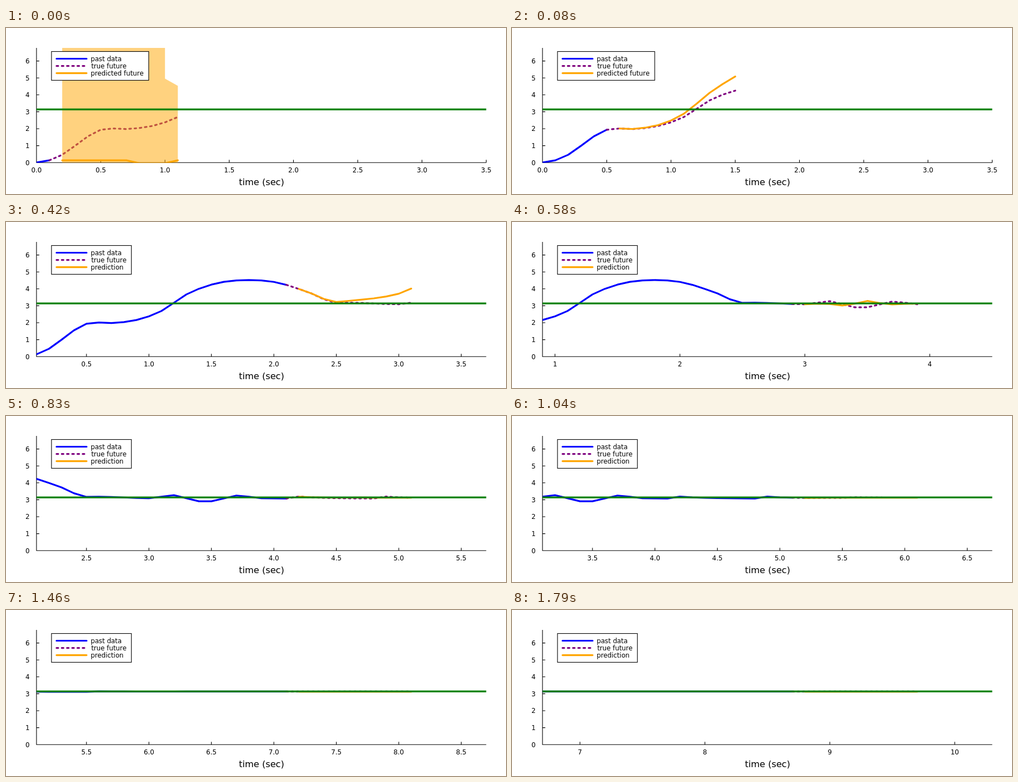
Write an HTML page that moves like this. It is 900x300 px and loops after 1.83 s.

```html
<!DOCTYPE html>
<html lang="en">
<head>
<meta charset="utf-8">
<style>
  html, body { margin: 0; width: 900px; height: 300px; overflow: hidden; background: #fff; }
  svg { display: block; font: 11.8px "DejaVu Sans", sans-serif; }
  .line { fill: none; stroke-width: 3.2; stroke-linecap: round; stroke-linejoin: round; }
  .past { stroke: #00f; }
  .future { stroke: #800080; stroke-dasharray: 3 6.4; }
  .guess { stroke: #ffa500; }
  .level { stroke: #008000; }
  .axis { fill: none; stroke: #000; stroke-width: 1.1; }
</style>
</head>
<body>
<svg width="900" height="300" viewBox="0 0 900 300">
  <clipPath id="plot"><rect x="54.9" y="36" width="809.5" height="207.4"/></clipPath>
  <path id="axes" class="axis"/>
  <g id="xLabels" text-anchor="middle"></g>
  <g id="yLabels" text-anchor="end"></g>
  <text x="460" y="284" font-size="16.2" text-anchor="middle">time (sec)</text>
  <g clip-path="url(#plot)">
    <path id="past" class="line past"/>
    <path id="future" class="line future"/>
    <path id="band" fill="#ffa500" fill-opacity=".5"/>
    <path id="guess" class="line guess"/>
    <path class="line level" d="M50 147.1H870"/>
  </g>
  <rect id="box" x="81.9" y="42.5" height="52" fill="#fff" stroke="#000" stroke-width="1.1"/>
  <path class="line past" d="M91 55.5H145"/>
  <path class="line future" d="M91 68.6H145"/>
  <path class="line guess" d="M91 81.6H145"/>
  <text x="152.4" y="59.9">past data</text>
  <text x="153.4" y="73">true future</text>
  <text id="guessName" x="152.4" y="86"></text>
</svg>
<script>
const $ = id => document.getElementById(id);
const LEFT = 54.9, WIDTH = 809.5, TOP = 36, BASE = 243.2, UNIT = 30.6;
const LOOP = 1830, STEPS = 44, HORIZON = 10, REST = 3.13;
const range = (from, to) => Array.from({ length: to - from + 1 }, (_, n) => from + n);

// Turning points of the swing: [tenths of a second, angle].
const keys = [
  [0, 0], [2, .46], [4, 1.55], [5, 1.94], [7, 1.98], [9, 2.16], [11, 2.69],
  [13, 3.67], [15, 4.25], [18, 4.52], [20, 4.41], [23, 3.73], [25, 3.17],
  [26, 3.18], [30, 3.09], [32, 3.27], [34, 2.91], [35, 2.91], [37, 3.25], [38, 3.18]
];
const LAST_KEY = keys[keys.length - 1][0];

const rise = n => (keys[n + 1][1] - keys[n][1]) / (keys[n + 1][0] - keys[n][0]);

// Tangent that stays flat at peaks, so the curve never overshoots.
function tangent(n) {
  if (n === 0 || n === keys.length - 1) return 0;
  const before = rise(n - 1), after = rise(n);
  if (before * after <= 0) return 0;
  const w0 = keys[n][0] - keys[n - 1][0], w1 = keys[n + 1][0] - keys[n][0];
  return (before * w1 + after * w0) / (w0 + w1);
}

function swing(i) {
  const n = Math.max(0, keys.findIndex(key => key[0] >= i) - 1);
  const [t0, v0] = keys[n], [t1, v1] = keys[n + 1];
  const w = t1 - t0, s = (i - t0) / w, r = 1 - s;
  return v0 + (v1 - v0) * s * s * (3 - 2 * s)
    + w * s * r * (r * tangent(n) - s * tangent(n + 1));
}

// Small kicks every 0.7 s that fade out around the upright position.
function settle(i) {
  const kick = .12 * Math.exp(-(i % 7) / 2) - .06;
  return REST + kick * Math.exp(-Math.max(0, i - 49) / 4);
}

const angle = i => i <= LAST_KEY ? swing(i) : settle(i);

// Forecast j tenths past its first point: flat, then diverging, then settled.
const drift = step => .055 * 2 ** -Math.abs(step - 6);

function forecast(step, now, j) {
  if (step === 0) return j > 5 && j < 9 ? -.04 : angle(now);
  if (step < 14) return angle(now + 1 + j) + drift(step) * j ** 2.5;
  const wobble = .17 * Math.exp(-(step - 14) / 1.5 - ((j - 4.5) / 2.2) ** 2);
  return REST - .005 + (angle(now + 1) - REST) * Math.exp(-j / 1.2)
    + wobble * Math.sin((j - 4) * Math.PI / 2.2);
}

function spread(step, j) {
  if (step === 0) return j < 8 ? 1e4 : 5 - .6 * (j - 8);
  return step < 14 ? 1.1 * j * drift(step) : 0;
}

const yAt = v => BASE - UNIT * v;
const toPath = points => "M" + points.map(p => p.map(n => n.toFixed(2)).join(" ")).join("L");
const label = (x, y, text) => `<text x="${x.toFixed(2)}" y="${y.toFixed(2)}">${text}</text>`;

function draw(step) {
  const now = 1 + 2 * step;
  const early = now < 20;
  const start = Math.max(0, now - 20) / 10;
  const span = early ? 3.5 : 3.6;
  const end = start + span + 1e-6;
  const xAt = t => LEFT + (t - start) / span * WIDTH;
  const point = (i, v) => [xAt(i / 10), yAt(v)];
  const series = (from, to) => toPath(range(from, to).map(i => point(i, angle(i))));
  const edge = sign => range(0, HORIZON - 1).map(j =>
    point(now + 1 + j, forecast(step, now, j) + sign * spread(step, j)));

  $("past").setAttribute("d", series(Math.max(0, now - 21), now));
  $("future").setAttribute("d", series(now, now + HORIZON));
  $("guess").setAttribute("d", toPath(edge(0)));
  $("band").setAttribute("d", toPath([...edge(1), ...edge(-1).reverse()]) + "Z");

  // Whole seconds when four of them fit, otherwise halves.
  const whole = !early && Math.floor(end) - Math.ceil(start) >= 3;
  const gap = whole ? 1 : .5;
  let axes = `M${LEFT} ${TOP}V${BASE}H${LEFT + WIDTH}`, labels = "";
  for (let t = Math.ceil(start / gap) * gap; t <= end; t += gap) {
    const x = xAt(t);
    axes += `M${x.toFixed(2)} ${BASE}v-5`;
    labels += label(x, 261.4, t.toFixed(whole ? 0 : 1));
  }
  for (let v = 0; v <= 6; v++) axes += `M${LEFT} ${yAt(v)}h5`;
  $("axes").setAttribute("d", axes);
  $("xLabels").innerHTML = labels;

  $("box").setAttribute("width", early ? 175 : 143.8);
  $("guessName").textContent = early ? "predicted future" : "prediction";
}

$("yLabels").innerHTML = range(0, 6).map(v => label(42.6, yAt(v) + 4.4, v)).join("");

// 24 steps per second, rounded to hundredths.
const stepStart = step => Math.round(step * 25 / 6) * 10;
let shown = -1;
function tick() {
  const ms = performance.now() % LOOP;
  let step = STEPS - 1;
  while (stepStart(step) > ms) step--;
  if (step !== shown) draw(shown = step);
  requestAnimationFrame(tick);
}
tick();
</script>
</body>
</html>
```
